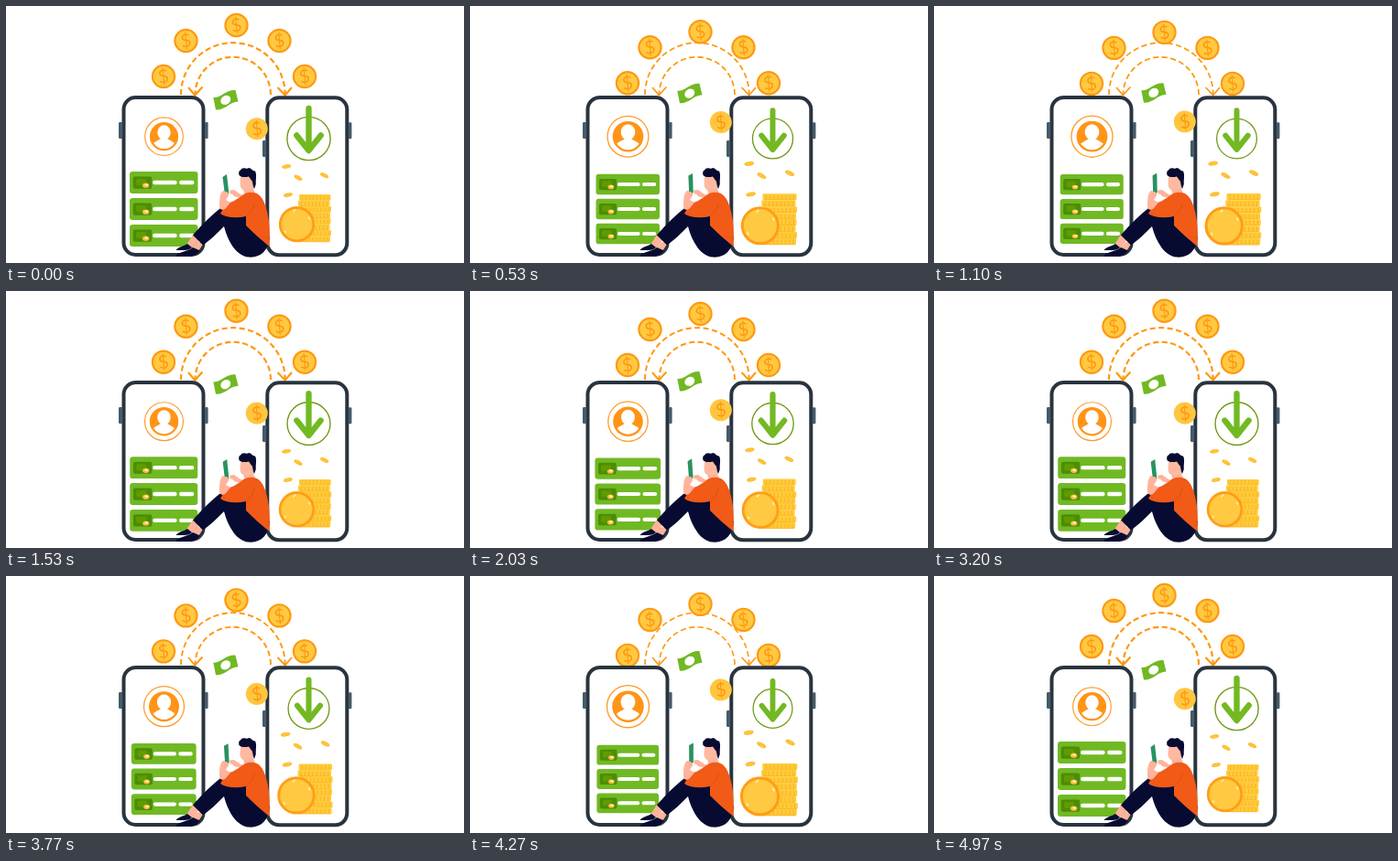
An HTML page for the animation above (5010 ms loop, 500x281 px).

```html
<!DOCTYPE html>
<html lang="en">
<head>
<meta charset="utf-8">
<title>Money transfer</title>
<style>
html, body { margin: 0; width: 100%; height: 100%; overflow: hidden; background: #fff; }
svg { display: block; width: 100%; height: 100%; }
text { font: 20px Lato, "Open Sans", sans-serif; text-anchor: middle; fill: #ff9811; }
</style>
</head>
<body>
<svg viewBox="0 0 500 281">
  <defs>
    <g id="coin">
      <circle r="12.1" fill="#ffc941" stroke="#ff9811" stroke-width="2.2"/>
      <text y="7" transform="rotate(-9)">$</text>
    </g>
    <g id="card">
      <rect x="135" y="-12" width="74.5" height="24" rx="3.2" fill="#70b923"/>
      <rect x="138.7" y="-6.5" width="20.5" height="13.2" rx="2" fill="#4d8c08"/>
      <rect x="142" y="-4" width="11" height="7" rx="1.5" fill="#5f9c00"/>
      <ellipse cx="152.6" cy="3.2" rx="3.6" ry="2.6" fill="#ffbd3e"/>
      <ellipse cx="153.1" cy="2.6" rx="2" ry="1.1" fill="#fff0cf"/>
      <path d="M162.3 0H184.5M191.3 0H203.3" stroke="#fff" stroke-width="4.4" stroke-linecap="round"/>
    </g>
    <g id="phone">
      <rect x="2" y="2" width="87" height="172" rx="13" fill="#fff" stroke="#28343f" stroke-width="4"/>
      <rect x="90.5" y="29" width="3.6" height="18" rx="1.2" fill="#485a68"/>
    </g>
    <clipPath id="disc"><circle cx="172.5" cy="142.7" r="13.4"/></clipPath>
  </defs>

  <g id="arcs" fill="none" stroke="#ff9811">
    <path d="M191 97A56.85 56.85 0 0 1 304.7 97" stroke-dasharray="6.2 3.4"/>
    <path d="M289 97A41.25 41.25 0 0 0 206.5 97" stroke-dasharray="6.2 3.4"/>
    <path d="M199 89L206.3 97.5L214.5 88.5M296.5 89L304.7 97.5L312 89"/>
  </g>
  <g id="coins"></g>

  <use href="#phone" x="126.5" y="98"/>
  <rect x="123" y="127" width="4.3" height="18" rx="1.2" fill="#485a68"/>
  <use href="#phone" x="283.3" y="98.3"/>
  <rect x="280" y="147" width="4.3" height="18" rx="1.2" fill="#485a68"/>

  <g id="profile">
    <circle cx="172.5" cy="142.7" r="20.8" fill="#fff" stroke="#ff9a28" stroke-width="1.2"/>
    <circle cx="172.5" cy="142.7" r="15.6" fill="#ff9416"/>
    <g clip-path="url(#disc)" fill="#fff">
      <ellipse cx="172.5" cy="138.3" rx="7.2" ry="8"/>
      <path d="M158 158C158 149 165 148 169 145H176C180 148 187 149 187 158Z"/>
    </g>
  </g>
  <g id="cards">
    <use href="#card" y="193"/><use href="#card" y="222"/><use href="#card" y="251"/>
  </g>

  <g id="download" fill="none">
    <circle cx="330.5" cy="145" r="23.6" stroke="#719a16" stroke-width="1.4"/>
    <path d="M330.5 112V157M317.3 141.5L330.5 158L343.7 141.5" stroke="#72b922" stroke-width="6.4" stroke-linecap="round" stroke-linejoin="round"/>
  </g>

  <g id="savings">
    <g id="flat" fill="#ffc632" stroke="#fbae20" stroke-width=".6"></g>
    <g id="stack"></g>
    <circle cx="317.5" cy="238.7" r="18.2" fill="#ffc941" stroke="#ff9e17" stroke-width="2.8"/>
    <path d="M314 224.5l1.7-1.5M330.5 231l1 2M304.5 246l1 1.6" stroke="#fff0bd" stroke-width="1.6" stroke-linecap="round"/>
  </g>

  <g id="bill">
    <path d="M226.3 100C235 101 239 91.5 250.5 92L253.5 104.5C244 104.5 240 114 229 113.5Z" fill="#70b923"/>
    <ellipse cx="239.8" cy="102.8" rx="5.8" ry="4.7" transform="rotate(-35 239.8 102.8)" fill="#fff"/>
  </g>
  <g id="drop">
    <g transform="translate(273.8 134.3) rotate(-9)">
      <circle r="12" fill="#ffc640"/>
      <text y="7">$</text>
    </g>
  </g>

  <g id="person">
    <path d="M204 250L211 255L203 265L197 261ZM209 258L216 259L210 268L203 265Z" fill="#ffb39a"/>
    <path d="M236 220C229 224 213 240 204 250.5L215 261.5C223 256 230 249 238 241C242 256 250 272 264 274.5C278 276 287 267 288 252L268 226Z" fill="#080b31"/>
    <path d="M198 260L203 264C200 267.5 195 267 185.5 267C188 263 194 263 198 260Z" fill="#080b31"/>
    <path d="M204 264L212 267.5C208 272 205 274 200 273.7H185C187 269 197 269 204 264Z" fill="#080b31"/>
    <path d="M244.5 203L249 201L257 206.5L260 206L256 210L249 208Z" fill="#ffb39a"/>
    <path d="M259 200L269 197L272 205L261 208Z" fill="#ffb39a"/>
    <path d="M261 205C269 202 276 204 280 211C286 222 289 240 287.5 263C279 256 270 248 262 240V230C252 232 241 232 234 227L241 215C246 216 254 210 261 205Z" fill="#f15a17"/>
    <path d="M262 230C266 227 270 221 271 216" fill="none" stroke="#d94b0e" stroke-width=".7"/>
    <path d="M237 202C233 205 233 213 233 219C233 223 237 224 240 221L245 215L240 212L243 207L241 203Z" fill="#ffb39a"/>
    <path d="M256.5 186C255 193 255 198 258 200.5C263 203 270 201 271.5 194L269 184Z" fill="#ffb9a1"/>
    <path d="M254.5 185C253 179 257 180 257 178C260 176 263 179 265 177C268 177 268 180 272 180.5C274 184 272.5 189 272.8 195L271 200C269 196 270 192 267.5 190L265 186.5C261 187.5 257 187.5 254.5 185Z" fill="#080b31"/>
    <path id="handset" d="M236.5 187L241 184L243.4 205L239.3 209Z" fill="#299260"/>
    <path d="M237 203C239 202 243 203 243.5 206L239 211L235 209ZM244.3 201.5L249 201L249.5 204L245 206Z" fill="#ffb39a"/>
  </g>
</svg>

<script>
const LOOP = 5010, CYCLE = LOOP / 3;
const byId = id => document.getElementById(id);
const add = (parent, tag, attrs) => {
  const node = document.createElementNS("http://www.w3.org/2000/svg", tag);
  for (const key in attrs) node.setAttribute(key, attrs[key]);
  byId(parent).appendChild(node);
};

[[172, 77], [196.5, 38], [251.5, 21], [298.5, 38], [326, 77]]
  .forEach(([x, y]) => add("coins", "use", { href: "#coin", x, y }));

[[306.3, 175.5, -8], [319, 187.8, 28], [347.5, 185.2, 25], [308, 206.6, -10]]
  .forEach(([x, y, tilt]) => add("flat", "ellipse",
    { rx: 4.7, ry: 1.8, transform: `translate(${x} ${y}) rotate(${tilt})` }));

for (let row = 0; row < 8; row++) {
  const x = 320 + [0, -1, 0.5, -0.5][row % 4], y = 206 + row * 6.5;
  add("stack", "rect", { x, y, width: 34.5, height: 6.3, rx: 1.2, fill: "#ffcb38" });
  add("stack", "path", { d: `M${x + 1} ${y + 6.2}h32.5`, stroke: "#f9ae20", "stroke-width": 0.8 });
  add("stack", "path", { d: `M${x + 3} ${y + 3.4}h30`, stroke: "#f9b324",
    "stroke-width": 4, "stroke-dasharray": "1 3" });
}

const transform = (id, value) => byId(id).setAttribute("transform", value);
const slide = (id, dy) => transform(id, `translate(0 ${dy})`);
const scale = (id, s, x, y) =>
  transform(id, `translate(${x} ${y}) scale(${s}) translate(${-x} ${-y})`);

function draw(time) {
  const sway = (1 - Math.cos(2 * Math.PI * time / CYCLE)) / 2;
  slide("coins", 10.2 * sway);
  slide("bill", -10.2 * sway);
  slide("drop", -10.2 * sway);
  scale("profile", 1 + 0.11 * sway, 172.5, 142.7);
  scale("cards", 1 - 0.095 * sway, 172.2, 222);
  scale("download", 1 - 0.095 * sway, 330.5, 144);
  scale("savings", 1 + 0.105 * sway, 327, 217);
  transform("handset", `translate(${0.6 * sway} ${-1.8 * sway}) rotate(${7 * sway} 240 204)`);
  byId("arcs").setAttribute("stroke-width", 2.2 - 0.6 * sway);
}

const start = performance.now();
function tick() {
  draw((performance.now() - start) % LOOP);
  requestAnimationFrame(tick);
}
tick();
</script>
</body>
</html>
```
